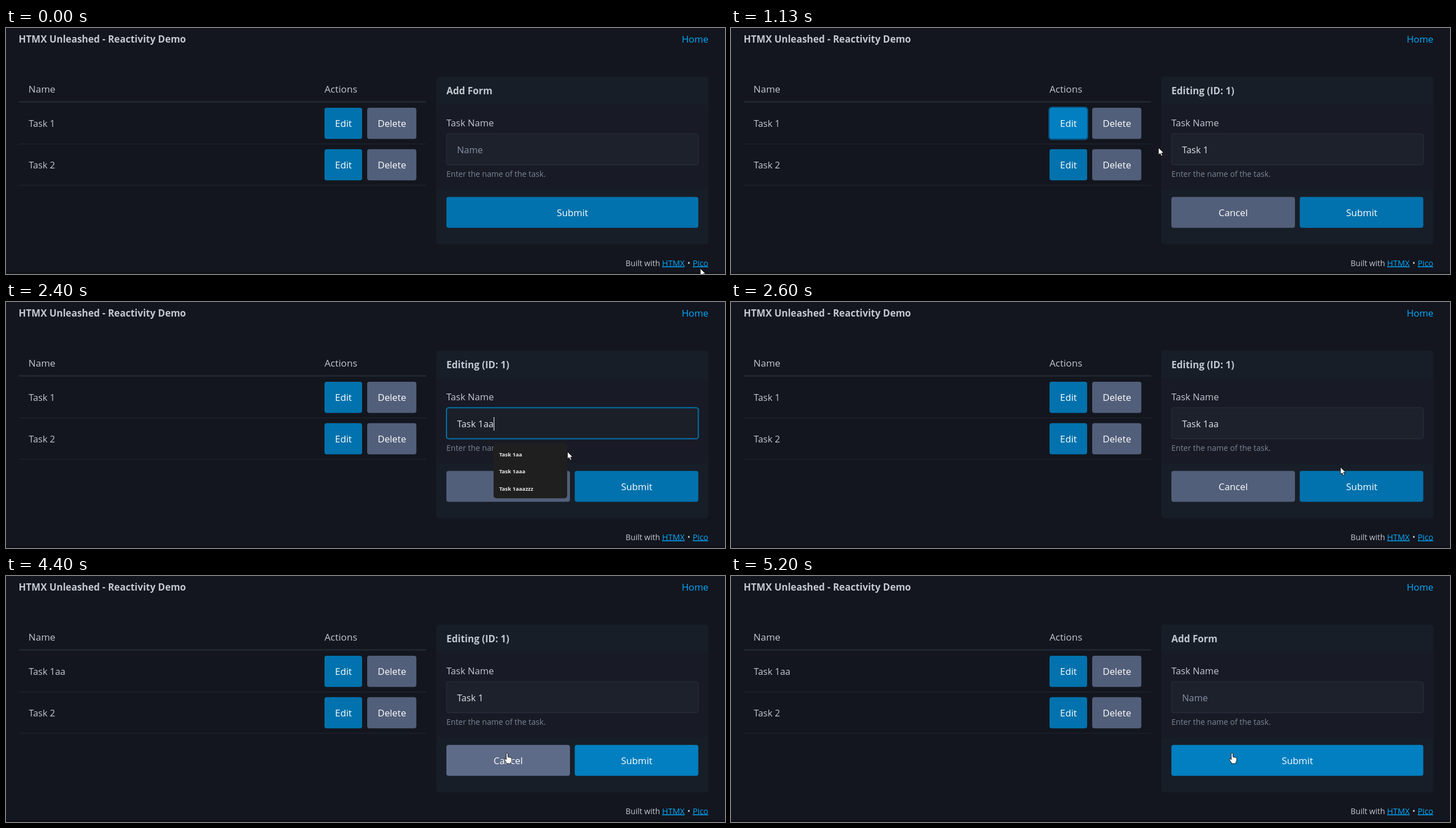
These frames come from a looping animation (1280 by 438 pixels, 5.99 s). An HTML page:

```html
<!DOCTYPE html>
<html lang="en">
<head>
<meta charset="utf-8">
<title>Reactivity Demo</title>
<style>
html, body { margin: 0; height: 100%; overflow: hidden; background: #13161e; }
svg { display: block; width: 100vw; height: 100vh; }
text { font: 500 16.8px "Open Sans", "Noto Sans", sans-serif; fill: #c2c7d0; white-space: pre; }
.bold { font-size: 17px; font-weight: 700; }
.head { font-size: 17.1px; }
.task { font-size: 16.4px; }
.small { font-size: 14px; font-weight: 400; }
.link { fill: #01aaff; }
.under { text-decoration: underline 1px #0183c5; text-underline-offset: 2px; }
.btn { fill: #fff; text-anchor: middle; }
.primary { fill: #0172ad; }
.secondary { fill: #525f7a; }
.menu text { font-size: 9.6px; font-weight: 700; fill: #e8e8e8; }
.line { fill: #202632; }
</style>
</head>
<body>
<svg viewBox="0 0 1280 438">
  <rect width="1280" height="438" fill="#13161e"/>
  <rect y="435" width="1280" height="3" fill="#0e1018"/>
  <text class="bold" x="22.5" y="26">HTMX Unleashed - Reactivity Demo</text>
  <text class="link" x="1250.5" y="26" text-anchor="end">Home</text>

  <text class="head" x="40" y="115">Name</text>
  <text class="head" x="567" y="115">Actions</text>
  <rect class="line" x="23" y="130" width="725" height="3"/>
  <rect class="line" x="23" y="206" width="725" height="1"/>
  <rect class="line" x="23" y="279.5" width="725" height="1"/>
  <text id="task" class="task" x="40.5" y="176"></text>
  <text class="task" x="40.5" y="250">Task 2</text>
  <rect id="edit" class="primary" x="567" y="142" width="67" height="55.5" rx="4"/>
  <rect id="ring" x="566" y="141" width="69" height="57.5" rx="5" fill="none" stroke="#09507a" stroke-width="2"/>
  <rect class="primary" x="567" y="215.7" width="67" height="55.5" rx="4"/>
  <rect class="secondary" x="643" y="142" width="87.5" height="55.5" rx="4"/>
  <rect class="secondary" x="643" y="215.7" width="87.5" height="55.5" rx="4"/>
  <text class="btn" x="600.7" y="176">Edit</text>
  <text class="btn" x="687" y="176">Delete</text>
  <text class="btn" x="600.7" y="250">Edit</text>
  <text class="btn" x="687" y="250">Delete</text>

  <rect x="766" y="86.5" width="484.5" height="298.5" rx="5" fill="#181e27"/>
  <rect x="766" y="136" width="484.5" height="152" fill="#181b25"/>
  <text id="title" class="bold" x="784" y="117.5"></text>
  <text x="784" y="175" style="font-size:16.6px">Task Name</text>
  <rect id="field" x="784.2" y="188.2" width="448.3" height="55.3" rx="4"/>
  <text id="value" class="task" x="803" y="223"></text>
  <rect id="caret" y="205" width="1.2" height="24" fill="#e0e3e7"/>
  <text class="small" x="784" y="265" style="fill:#7b8495">Enter the name of the task.</text>
  <g id="cancel">
    <rect class="secondary" x="784" y="300.7" width="220" height="55" rx="4"/>
    <text class="btn" x="894" y="335">Cancel</text>
  </g>
  <rect id="submit" class="primary" y="300.7" height="55" rx="4"/>
  <text id="submitText" class="btn" y="335">Submit</text>

  <text class="small" x="1103" y="423.5">Built with</text>
  <text class="small link under" x="1168" y="423.5" style="font-size:14.5px">HTMX</text>
  <text class="small" x="1213" y="423.5">•</text>
  <text class="small link under" x="1222.5" y="423.5" style="font-size:14.3px">Pico</text>

  <g id="menu" class="menu">
    <rect x="868" y="251" width="131" rx="5" fill="#1f1f1f"/>
    <text x="878"></text><text x="878"></text><text x="878"></text><text x="878"></text>
  </g>
  <path id="cursor"/>
</svg>
<script>
const $ = id => document.getElementById(id);
const LOOP = 5990, RATE = 15;
const options = ["Task 1aa", "Task 1a", "Task 1aaa", "Task 1aaazzz"];

// Pointer path: [tick, x, y]
const path = [
  [0, 1236, 428], [5, 820, 265], [9, 593, 163], [14, 593, 163], [17, 761, 213],
  [21, 914, 239], [33, 914, 239], [39, 1085, 294], [43, 1097, 321], [57, 1097, 321],
  [61, 1000, 293], [65, 892, 318], [66, 892, 315], [90, 892, 315]
];
const shapes = {
  arrow: "M0 0V13L3 10.3L5 15L7.3 14L5.4 9.6H9.5Z",
  hand: "M-1.5 1q1.5-2 3 0V7l5 1.2q1.8.5 1.8 2V13q0 2-1.5 4V19H-1V17.5L-5 12q-.5-2 1.2-1.8L-1.5 12Z",
  beam: "M-3-7h6M0-7V6M-3 6h6"
};

const show = (id, on) => $(id).style.display = on ? "" : "none";
const within = (v, a, b) => v >= a && v < b;
const ramp = (f, start) => Math.min(1, Math.max(0, (f - start + 1) / 3));
const mix = (from, to, k) => `color-mix(in srgb, ${to} ${k * 100}%, ${from})`;
const blue = k => mix("#0172ad", "#017fc0", k);

function pointer(f) {
  const i = path.findIndex(p => p[0] > f);
  const [t0, x0, y0] = path[i - 1], [t1, x1, y1] = path[i];
  const k = (f - t0) / (t1 - t0);
  return [x0 + (x1 - x0) * k, y0 + (y1 - y0) * k];
}

function drawCursor(f) {
  const [x, y] = pointer(f);
  const onRow = within(x, 567, 731) && (within(y, 142, 198) || within(y, 216, 271));
  const onForm = within(y, 301, 356) && (within(x, 784, 1004) || within(x, 1013, 1233));
  const inField = within(x, 784, 1233) && within(y, 188, 244);
  const kind = onRow || onForm ? "hand" : inField ? "beam" : "arrow";
  const c = $("cursor");
  c.setAttribute("d", shapes[kind]);
  c.setAttribute("transform", `translate(${x} ${y})`);
  c.setAttribute("fill", kind === "beam" ? "none" : "#fff");
  c.setAttribute("stroke", kind === "beam" ? "#c8c8c8" : "#111");
}

function drawMenu(typed) {
  const list = options.filter(o => o.startsWith(typed));
  const [box, ...rows] = $("menu").children;
  box.setAttribute("height", 7 + list.length * 30.5);
  rows.forEach((row, i) => {
    row.textContent = list[i] || "";
    row.setAttribute("y", 274.5 + i * 30.5);
  });
}

function draw(f) {
  const editing = within(f, 13, 74), focused = within(f, 21, 37);
  const typed = within(f, 30, 53) ? "Task 1aa" : within(f, 24, 30) ? "Task 1a" : "Task 1";

  $("task").textContent = f < 53 ? "Task 1" : "Task 1aa";
  $("edit").style.fill = blue(f < 22 ? ramp(f, 12) : 1 - ramp(f, 22));
  show("ring", within(f, 12, 22));

  $("title").textContent = editing ? "Editing (ID: 1)" : "Add Form";
  $("value").textContent = editing ? typed : "Name";
  $("value").style.fill = editing ? "#e0e3e7" : "#8891a4";
  $("field").style.cssText = focused
    ? "fill:#1a1f28;stroke:#0172ad;stroke-width:2"
    : "fill:#1c212c;stroke:#2a3140;stroke-width:1";
  show("caret", focused);
  $("caret").setAttribute("x", 803 + $("value").getComputedTextLength());

  show("cancel", editing);
  $("cancel").firstElementChild.style.fill = mix("#525f7a", "#5d6b89", ramp(f, 63));
  $("submit").setAttribute("x", editing ? 1012.5 : 784);
  $("submit").setAttribute("width", editing ? 220 : 448.5);
  $("submit").style.fill = blue(f < 74 ? ramp(f, 41) : ramp(f, 75));
  $("submitText").setAttribute("x", editing ? 1122.8 : 1008.3);

  show("menu", within(f, 24, 39));
  drawMenu(typed);
  drawCursor(f);
}

function tick() {
  draw(Math.floor((performance.now() % LOOP + 5) * RATE / 1000));
  requestAnimationFrame(tick);
}
tick();
</script>
</body>
</html>
```
